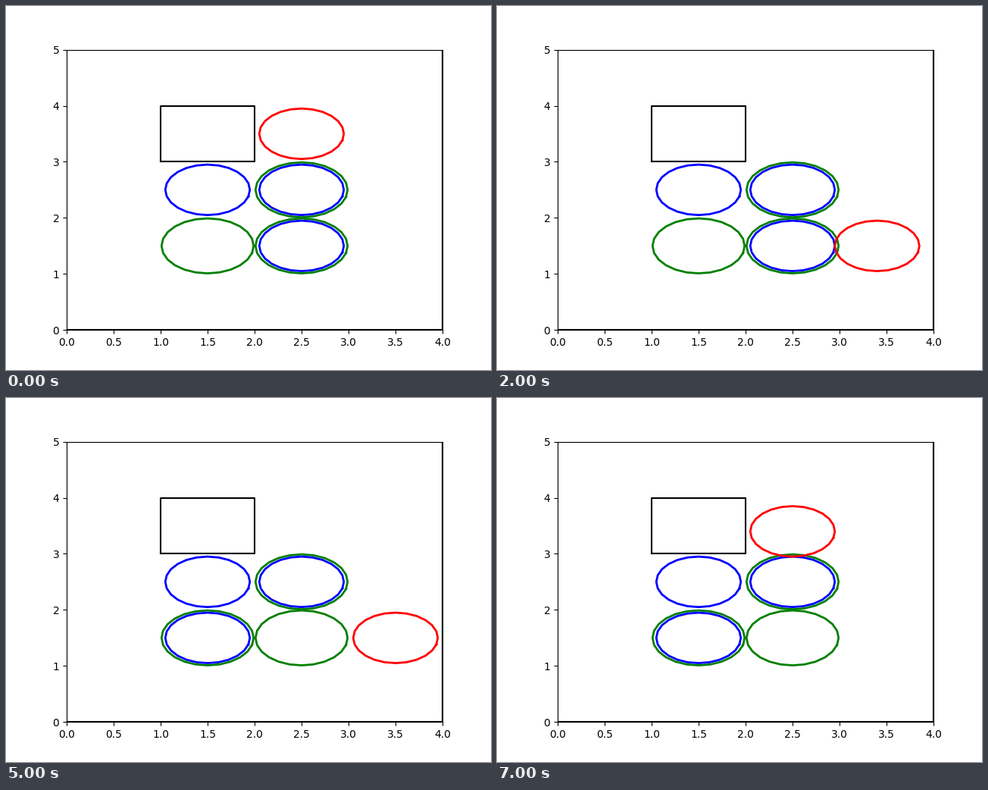
A matplotlib script for the animation above (8 s loop, 640 by 480 pixels).

```python
import numpy as np
import matplotlib.pyplot as plt
from matplotlib.animation import FuncAnimation

BOX_R, GOAL_R = 0.45, 0.49
ANGLES = np.radians(np.arange(-15, 346, 15))

# Player stops, one per second; the push left ends at the fourth stop.
STOPS = [(2.5, 3.5), (3.5, 4.5), (3.4, 1.5), (2.4, 1.5),
         (2.5, 1.5), (3.5, 1.5), (3.5, 4.5), (2.5, 3.4)]
PUSHED_AT = 3
GOALS = [(1.5, 1.5), (2.5, 1.5), (2.5, 2.5)]
FIXED_BOXES = [(1.5, 2.5), (2.5, 2.5)]


def ring(center, radius):
    x, y = center
    return x + radius * np.cos(ANGLES), y + radius * np.sin(ANGLES)


def draw_ring(center, radius, color):
    return ax.plot(*ring(center, radius), color=color, lw=2)[0]


def draw_wall(x0, y0, x1, y1):
    ax.plot([x0, x1, x1, x0, x0], [y0, y0, y1, y1, y0], color="black", lw=1.5)


fig, ax = plt.subplots(figsize=(6.4, 4.8), dpi=100)
ax.set_xlim(0, 4)
ax.set_ylim(0, 5)

draw_wall(0, 0, 4, 5)
draw_wall(1, 3, 2, 4)
for goal in GOALS:
    draw_ring(goal, GOAL_R, "green")
for spot in FIXED_BOXES:
    draw_ring(spot, BOX_R, "blue")
box = draw_ring((2.5, 1.5), BOX_R, "blue")
player = draw_ring(STOPS[0], BOX_R, "red")


def update(i):
    box.set_data(*ring((1.5 if i >= PUSHED_AT else 2.5, 1.5), BOX_R))
    player.set_data(*ring(STOPS[i], BOX_R))
    return box, player


anim = FuncAnimation(fig, update, frames=len(STOPS), interval=1000,
                     repeat=True, repeat_delay=0)
plt.show()
```
